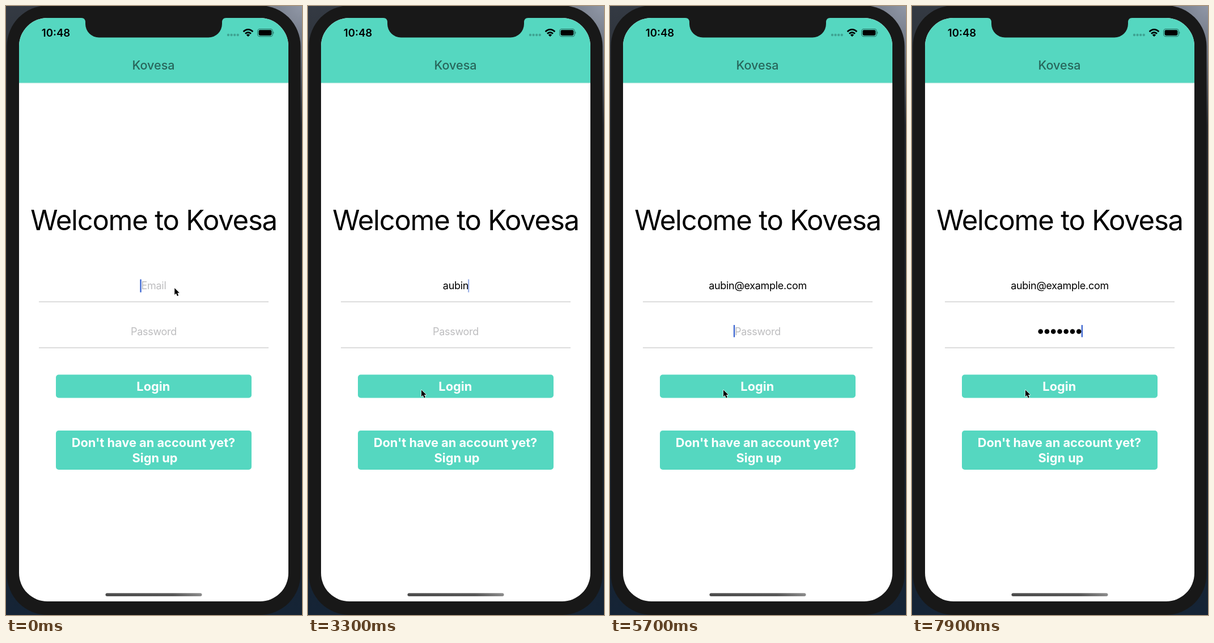
Write an HTML page that moves like this. It is 522x1073 px and loops after 8 s.

```html
<!DOCTYPE html>
<html lang="en">
<head>
<meta charset="utf-8">
<title>Login form</title>
<style>
  html, body { margin: 0; width: 100%; height: 100%; overflow: hidden; background: #181818; }
  svg { display: block; width: 522px; height: 1073px; }
  text { font-family: Inter, "Open Sans", sans-serif; font-optical-sizing: none; text-anchor: middle; white-space: pre; }
  .clock { font-size: 18.6px; font-weight: 600; }
  .nav { font-size: 21.6px; font-weight: 500; fill: #27665b; }
  .title { font-size: 49px; letter-spacing: -0.025em; }
  .field { font-size: 18px; letter-spacing: -0.3px; }
  .hint { fill: #bdbdbf; }
  .button { font-size: 21.8px; font-weight: 700; fill: #fff; }
  .teal { fill: #55d7c0; }
  .rule { stroke: #d2d2d2; stroke-width: 1.6; }
</style>
</head>
<body>
<svg viewBox="0 0 522 1073">
  <defs>
    <linearGradient id="desk" x2="0" y2="1">
      <stop offset="0" stop-color="#343a43"/>
      <stop offset=".2" stop-color="#24282e"/>
      <stop offset=".6" stop-color="#1c2126"/>
      <stop offset="1" stop-color="#152436"/>
    </linearGradient>
    <radialGradient id="glow" gradientUnits="userSpaceOnUse" cx="522" cy="0" r="210">
      <stop offset="0" stop-color="#9097a6"/>
      <stop offset="1" stop-color="#9097a6" stop-opacity="0"/>
    </radialGradient>
    <linearGradient id="bar" x2="1" y2="0">
      <stop offset="0" stop-color="#4c4c4c"/>
      <stop offset=".7" stop-color="#575757"/>
      <stop offset="1" stop-color="#8c8c8c"/>
    </linearGradient>
    <clipPath id="screen"><rect x="23" y="21" width="475" height="1028" rx="50"/></clipPath>
  </defs>

  <rect width="522" height="1073" fill="url(#desk)"/>
  <rect width="522" height="1073" fill="url(#glow)"/>
  <rect x="1.5" y="-1" width="518" height="1074" rx="72" fill="#181818"/>

  <g clip-path="url(#screen)">
    <rect x="23" y="21" width="475" height="1028" fill="#fff"/>
    <rect class="teal" x="23" y="21" width="475" height="114"/>
    <rect x="23" y="135" width="475" height="1.2" fill="#a9e4d9"/>
  </g>
  <path fill="#181818" d="M133 20V21Q140 21 140 29V31.5A24 24 0 0 0 164 55.5H357A24 24 0 0 0 381 31.5V29Q381 21 388 21V20Z"/>

  <text class="clock" x="88" y="54">10:48</text>
  <g fill="#3fa493">
    <circle cx="392" cy="51" r="2.2"/><circle cx="397.6" cy="51" r="2.2"/>
    <circle cx="403.2" cy="51" r="2.2"/><circle cx="408.8" cy="51" r="2.2"/>
  </g>
  <g fill="none" stroke="#000" stroke-width="2.7">
    <path d="M418.6 45.2Q427 37.6 435.4 45.2"/>
    <path d="M421.9 48.8Q427 44.2 432.1 48.8"/>
  </g>
  <path d="M427 54L423.8 50.9Q427 48.2 430.2 50.9Z"/>
  <rect x="443.8" y="40.5" width="26.4" height="13.2" rx="3.8" fill="none" stroke="#2a7367" stroke-width="1.2"/>
  <rect x="445.6" y="42.3" width="22.8" height="9.6" rx="2.3"/>
  <path fill="#2a7367" d="M471.3 44.8Q473.6 47 471.3 49.4Z"/>

  <text class="nav" x="260" y="112">Kovesa</text>
  <text class="title" x="260.5" y="395">Welcome to Kovesa</text>

  <text class="field" id="email" x="260.5" y="499"></text>
  <text class="field hint" id="password" x="260.5" y="580">Password</text>
  <g id="dots"></g>
  <rect id="caret" width="2.3" rx=".6" fill="#3a64d0"/>
  <path class="rule" d="M58 521.3H463M58 602.3H463"/>

  <rect class="teal" x="88" y="649.5" width="345" height="41" rx="5"/>
  <text class="button" x="259.8" y="678">Login</text>
  <rect class="teal" x="88" y="748" width="345" height="69" rx="5"/>
  <text class="button" x="260" y="777">Don't have an account yet?</text>
  <text class="button" x="262.5" y="804">Sign up</text>

  <rect x="175.5" y="1034.5" width="170" height="5.5" rx="2.7" fill="url(#bar)"/>

  <path id="pointer" d="M0 0V11.8L2.7 9.3L4.7 13.9L6.9 13L4.9 8.6H8.6Z" stroke="#fff" stroke-width="1.3" paint-order="stroke" stroke-linejoin="round"/>
</svg>

<script>
const LOOP = 8000;
const CENTER = 260.5;
const DOT_GAP = 11.25;
const EMAIL = "aubin@example.com";
const emailKeys = [2100, 2250, 2400, 2550, 2700, 3500, 3700, 3850, 4050, 4250,
                   4400, 4600, 4800, 4950, 5100, 5250, 5350];
const passKeys = [6300, 6500, 6650, 6850, 7050, 7400, 7700];
const TAB = 5550;
const move = { start: 100, end: 1000, from: [297.3, 497], to: [200, 676.5] };

const $ = id => document.getElementById(id);
const email = $("email"), password = $("password"), caret = $("caret"), pointer = $("pointer");
const clamp = v => Math.min(1, Math.max(0, v));
const ease = p => p * p * (3 - 2 * p);
const pressed = (keys, t) => keys.filter(k => k <= t).length;

const dots = passKeys.map(() => {
  const dot = document.createElementNS("http://www.w3.org/2000/svg", "circle");
  dot.setAttribute("r", 4.3);
  dot.setAttribute("cy", 573.5);
  return $("dots").appendChild(dot);
});

// Solid after each key, then a soft blink once a second.
function blink(t) {
  const last = [0, ...emailKeys, TAB, ...passKeys].filter(k => k <= t).pop();
  const p = (t - last) % 1000;
  return p < 500 ? 1 : p < 850 ? clamp((700 - p) / 200) : (p - 850) / 150;
}

function placeCaret(x, y, height) {
  caret.setAttribute("x", x - 1.15);
  caret.setAttribute("y", y);
  caret.setAttribute("height", height);
}

// An empty field holds the caret just before its hint.
const hintStart = text => -text.getComputedTextLength() / 2 - 1;

function render(t) {
  const typed = pressed(emailKeys, t), hidden = pressed(passKeys, t);

  const value = typed ? EMAIL.slice(0, typed) : "Email";
  if (email.textContent !== value) email.textContent = value;
  email.classList.toggle("hint", !typed);

  password.style.display = hidden ? "none" : "";
  dots.forEach((dot, i) => {
    dot.style.display = i < hidden ? "" : "none";
    dot.setAttribute("cx", CENTER + (i - (hidden - 1) / 2) * DOT_GAP);
  });

  if (t < TAB) {
    const offset = typed ? email.getComputedTextLength() / 2 : hintStart(email);
    placeCaret(CENTER + offset, 481.5, 23);
  } else {
    const offset = hidden ? hidden * DOT_GAP / 2 : hintStart(password);
    placeCaret(CENTER + offset, 562, 21.5);
  }
  caret.setAttribute("opacity", blink(t));

  const p = ease(clamp((t - move.start) / (move.end - move.start)));
  const [x, y] = move.from.map((v, i) => v + (move.to[i] - v) * p);
  pointer.setAttribute("transform", `translate(${x} ${y})`);
}

const began = performance.now();
function tick() {
  render((performance.now() - began) % LOOP);
  requestAnimationFrame(tick);
}
tick();
</script>
</body>
</html>
```
